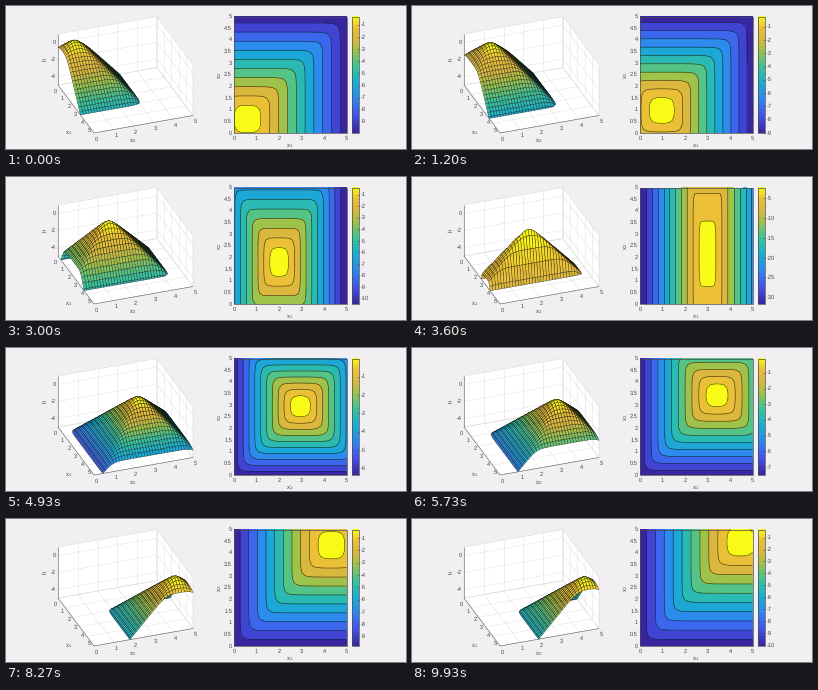
These frames come from a looping animation (400x143 px, 10 s). A matplotlib script:

```python
import numpy as np
import matplotlib.pyplot as plt
from matplotlib.animation import FuncAnimation
from matplotlib.collections import LineCollection, PolyCollection
from matplotlib.colors import LinearSegmentedColormap
from matplotlib.patches import Rectangle

W, H, DPI = 400, 143, 100
FRAMES, LOOP_MS = 150, 10000
Z_LOW, Z_HIGH = -5, 1
INK = "#4a4a4a"

plt.rcParams.update({"font.family": "Liberation Sans", "font.size": 4.1,
                     "mathtext.default": "regular",
                     "text.hinting": "no_hinting"})

parula = LinearSegmentedColormap.from_list("parula", [
    (0, (.22, .15, .62)), (.143, (.27, .32, .92)), (.286, (.18, .53, .94)),
    (.43, (.09, .69, .82)), (.571, (.24, .77, .59)), (.7, (.62, .76, .29)),
    (.8, (.85, .72, .24)), (.9, (.92, .75, .22)), (1, (.98, .98, .09))])

fig = plt.figure(figsize=(W / DPI, H / DPI), dpi=DPI, facecolor="#f1eff1")
ax = fig.add_axes([0, 0, 1, 1])
ax.set(xlim=(0, W), ylim=(H, 0))
ax.axis("off")
ax.autoscale(False)

# Contour panel and colour bar, in pixels
LEFT, RIGHT, TOP, BOTTOM = 228, 340.5, 10.5, 127
BAR_LEFT, BAR_RIGHT = 345.5, 352.5

grid = np.linspace(0, 5, 36)
X1, X2 = np.meshgrid(grid, grid, indexing="ij")
PX = LEFT + X1 * (RIGHT - LEFT) / 5
PY = BOTTOM - X2 * (BOTTOM - TOP) / 5

# The peak's path along the diagonal
path = np.polyfit([0, 2.27, 3.6, 4.93, 6.6, 8.27, 9.93],
                  [.6, 1.42, 2.15, 3.0, 3.87, 4.33, 4.47], 5)


def project(x1, x2, z):
    return np.stack([52 + 7.2 * x1 + 19.8 * x2,
                     79 + 9.6 * x1 - 3.5 * x2 - 8.5 * (z - Z_LOW)], axis=-1)


def soft_abs(d, eps=.1):
    return np.sqrt(d * d + eps * eps) - eps


def barrier(t, sharp=2.5):
    """Soft minimum of two ridges; the x1 ridge steepens briefly at x1 = 3."""
    center = np.polyval(path, t)
    pulse = np.exp(-((t - 3.6) / .45) ** 2)
    c1 = center + (3 - center) * pulse
    k1 = 2.46 + 8.75 * pulse
    drop1 = k1 * soft_abs(X1 - c1)
    drop2 = 2.46 * soft_abs(X2 - center)
    return .94 - np.logaddexp(sharp * drop1, sharp * drop2) / sharp


def clip_low(quad):
    """Cut a polygon at the floor of the box."""
    out = []
    for a, b in zip(quad, np.roll(quad, -1, axis=0)):
        if a[2] >= Z_LOW:
            out.append(a)
        if (a[2] >= Z_LOW) != (b[2] >= Z_LOW):
            out.append(a + (b - a) * (Z_LOW - a[2]) / (b[2] - a[2]))
    return np.array(out)


def corners(a):
    return np.stack([a[:-1, :-1], a[1:, :-1], a[1:, 1:], a[:-1, 1:]],
                    axis=-1).reshape(-1, 4)


QX1, QX2 = corners(X1), corners(X2)
back_to_front = np.argsort(9.6 * QX1[:, 0] - 3.5 * QX2[:, 0], kind="stable")


def label(x, y, s, **kw):
    kw = {"ha": "center", "va": "center", "color": INK, **kw}
    return ax.text(x, y, s, **kw)


def lines(segments, color, lw, z):
    ax.add_collection(LineCollection(segments, colors=color, linewidths=lw,
                                     zorder=z), autolim=False)


def segment(a, b):
    return [project(*map(float, a)), project(*map(float, b))]


def draw_box():
    walls = [
        [(0, 0, Z_LOW), (5, 0, Z_LOW), (5, 5, Z_LOW), (0, 5, Z_LOW)],
        [(0, 0, Z_LOW), (0, 5, Z_LOW), (0, 5, Z_HIGH), (0, 0, Z_HIGH)],
        [(0, 5, Z_LOW), (5, 5, Z_LOW), (5, 5, Z_HIGH), (0, 5, Z_HIGH)]]
    faces = [project(*np.array(w, float).T) for w in walls]
    ax.add_collection(PolyCollection(faces, facecolors="white",
                                     edgecolors="#dcdcdc", linewidths=.4,
                                     zorder=0), autolim=False)
    mesh = []
    for v in range(6):
        mesh += [segment((v, 0, Z_LOW), (v, 5, Z_LOW)),
                 segment((0, v, Z_LOW), (5, v, Z_LOW)),
                 segment((0, v, Z_LOW), (0, v, Z_HIGH)),
                 segment((v, 5, Z_LOW), (v, 5, Z_HIGH))]
    for z in (-4, -2, 0):
        mesh += [segment((0, 0, z), (0, 5, z)), segment((0, 5, z), (5, 5, z))]
    lines(mesh, "#e4e4e4", .4, 1)
    lines([segment((0, 0, Z_LOW), (5, 0, Z_LOW)),
           segment((5, 0, Z_LOW), (5, 5, Z_LOW)),
           segment((0, 0, Z_LOW), (0, 0, Z_HIGH))], "#666666", .4, 1)

    for v in range(6):
        label(49 + 6.9 * v, 85 + 7.8 * v, str(v))
        x, y = project(5, v, Z_LOW)
        label(x + 2, y + 6, str(v))
    for z in (-4, -2, 0):
        x, y = project(0, 0, z)
        label(x - 2.5, y, str(z), ha="right")
    label(63, 126.5, "x$_1$", fontsize=4.4)
    label(126.5, 135, "x$_2$", fontsize=4.4)
    label(39, 53, "h", fontsize=4.4, rotation=90)


def draw_panel():
    def frame(x0, x1):
        ax.add_patch(Rectangle((x0, TOP), x1 - x0, BOTTOM - TOP, fill=False,
                               ec=INK, lw=.5, zorder=5))

    frame(LEFT, RIGHT)
    frame(BAR_LEFT, BAR_RIGHT)
    ax.imshow(np.linspace(1, 0, 256)[:, None], cmap=parula, aspect="auto",
              extent=(BAR_LEFT, BAR_RIGHT, BOTTOM, TOP), zorder=2)
    ax.set(xlim=(0, W), ylim=(H, 0))
    for v in range(6):
        label(LEFT + v * (RIGHT - LEFT) / 5, 132.7, str(v))
    for v in np.arange(0, 5.1, .5):
        label(LEFT - 2, BOTTOM - v * (BOTTOM - TOP) / 5, f"{v:g}", ha="right")
    label(284, 139.8, "x$_1$", fontsize=4.4)
    label(214, 69.5, "x$_2$", fontsize=4.4, rotation=90)


draw_box()
draw_panel()
surface = PolyCollection([], edgecolors=(0, 0, 0, .75), linewidths=.27,
                         zorder=3)
ax.add_collection(surface, autolim=False)
bar_ticks = LineCollection([], colors=INK, linewidths=.4, zorder=6)
ax.add_collection(bar_ticks, autolim=False)
bar_labels = [label(BAR_RIGHT + 2, 0, "", ha="left") for _ in range(12)]
contours = []


def draw_surface(h):
    qz = corners(h)
    quads = np.stack([QX1, QX2, qz], axis=-1)[back_to_front]
    above = (quads[:, :, 2] >= Z_LOW).sum(axis=1)
    polys, values = [], []
    for quad, n in zip(quads, above):
        if n:
            part = quad if n == 4 else clip_low(quad)
            polys.append(project(*part.T))
            values.append(quad[0, 2])
    surface.set_verts(polys)
    surface.set_facecolor(parula((np.array(values) - h.min()) / np.ptp(h)))


def draw_contours(h):
    while contours:
        contours.pop().remove()
    levels = np.linspace(h.min(), h.max(), 12)
    edges = levels.copy()
    edges[0] -= 1e-6
    edges[-1] += 1e-6
    contours.append(ax.contourf(PX, PY, h, levels=edges, zorder=2,
                                colors=parula(np.linspace(0, 1, 11))))
    contours.append(ax.contour(PX, PY, h, levels=levels[1:-1],
                               colors=[(0, 0, 0, .85)], linewidths=.38,
                               linestyles="solid", zorder=3))
    return levels[0], levels[-2]


def draw_bar(low, high):
    span = high - low
    step = 5 if span > 22 else 2 if span > 10.5 else 1
    ticks = np.arange(np.ceil(low / step), np.floor(high / step) + 1) * step
    ys = BOTTOM - (ticks - low) / span * (BOTTOM - TOP)
    bar_ticks.set_segments([[(BAR_RIGHT - 1.3, y), (BAR_RIGHT, y)]
                            for y in ys])
    for i, text in enumerate(bar_labels):
        shown = i < len(ticks)
        text.set_visible(shown)
        if shown:
            text.set_y(ys[i])
            text.set_text(str(int(ticks[i])))


def update(i):
    h = barrier(i * LOOP_MS / FRAMES / 1000)
    draw_surface(h)
    draw_bar(*draw_contours(h))
    return []


anim = FuncAnimation(fig, update, frames=FRAMES, interval=LOOP_MS / FRAMES,
                     init_func=lambda: [], repeat=True, repeat_delay=0,
                     blit=False)
plt.show()
```
